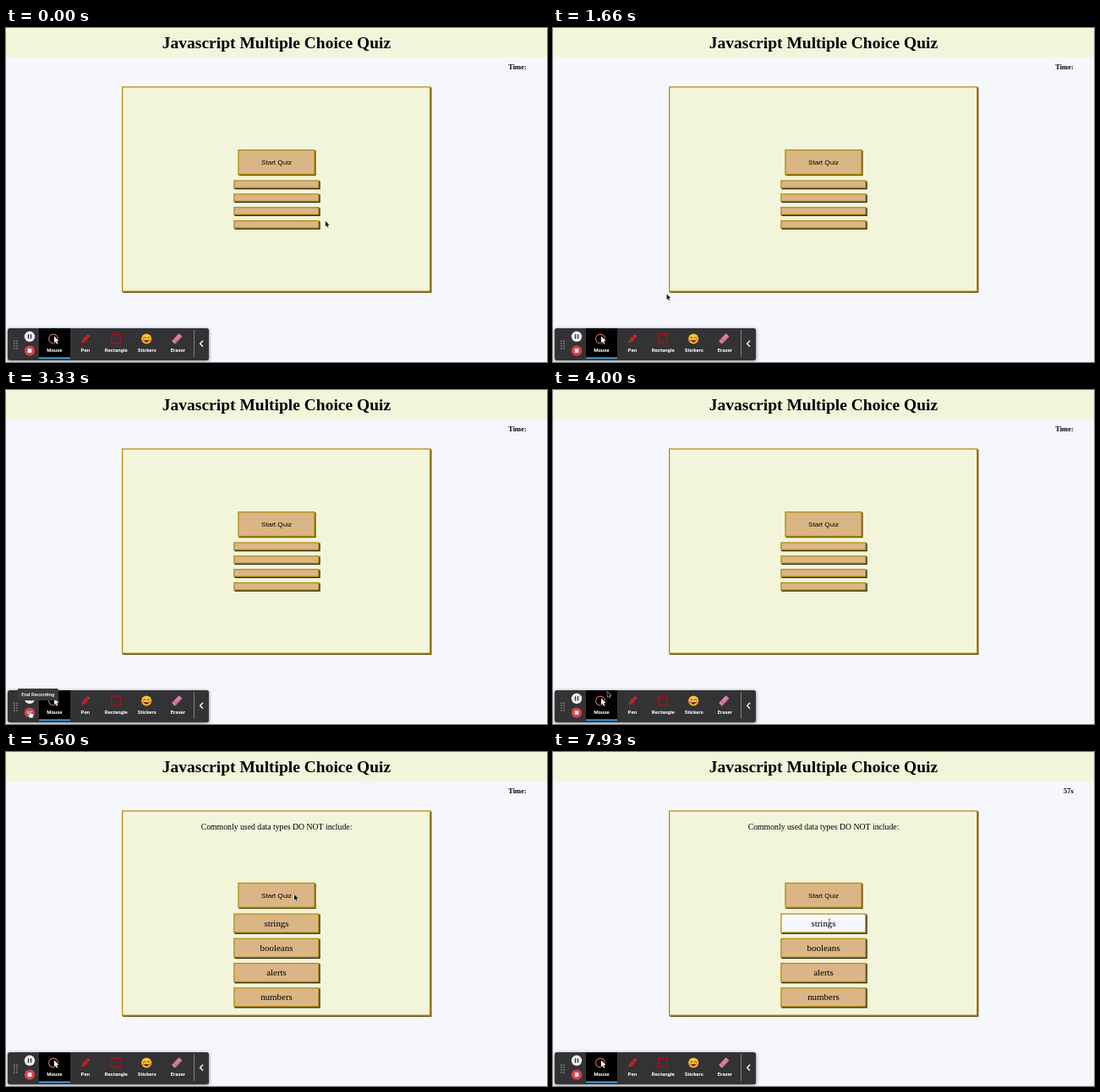
An HTML page with a canvas for the animation above (8000 ms loop, 640 px wide and 396 px high).

```html
<!DOCTYPE html>
<html lang="en">
<head>
<meta charset="utf-8">
<title>Quiz demo</title>
<style>
html, body { margin: 0; width: 100%; height: 100%; overflow: hidden; background: #f6f6fd; }
canvas { display: block; width: 640px; height: 396px; }
</style>
</head>
<body>
<canvas id="stage"></canvas>
<script>
const LOOP = 8000, STEP = 1000 / 15;
const SERIF = '"Liberation Serif", "Times New Roman", serif';
const SANS = '"Liberation Sans", Arial, sans-serif';
const UI = 'Roboto, sans-serif';
const BEIGE = '#f2f5da', TAN = '#dab686', GOLD = '#b08b10', PAGE = '#f6f6fd';

const canvas = document.getElementById('stage');
const dpr = window.devicePixelRatio || 1;
canvas.width = 640 * dpr;
canvas.height = 396 * dpr;
const c = canvas.getContext('2d');

// Pointer path: time, x, y
const path = [
  [0, 378, 229], [467, 340, 258], [600, 340, 258], [1400, 157, 301],
  [1533, 157, 301], [2000, 44, 374], [2333, 44, 374], [2667, 29, 381],
  [2800, 29, 381], [3133, 27, 382], [3333, 28, 380], [3533, 28, 380],
  [3667, 36, 376], [3733, 36, 376], [3867, 52, 366], [3933, 52, 366],
  [4467, 337, 165], [5533, 337, 165], [5667, 345, 173],
  [6800, 345, 173], [7067, 327, 202], [LOOP, 327, 202]
];

function pointerAt(t) {
  const i = Math.max(1, path.findIndex(k => k[0] >= t));
  const [t0, x0, y0] = path[i - 1], [t1, x1, y1] = path[i];
  const p = (t - t0) / (t1 - t0), e = p * p * (3 - 2 * p);
  return [x0 + (x1 - x0) * e, y0 + (y1 - y0) * e];
}

function rect(x, y, w, h, fill) {
  c.fillStyle = fill;
  c.fillRect(x, y, w, h);
}

function round(x, y, w, h, r, fill) {
  c.beginPath();
  c.roundRect(x, y, w, h, r);
  c.fillStyle = fill;
  c.fill();
}

function disc(x, y, r, fill) {
  c.beginPath();
  c.arc(x, y, r, 0, Math.PI * 2);
  c.fillStyle = fill;
  c.fill();
}

function ring(x, y, r, color, width) {
  c.beginPath();
  c.arc(x, y, r, 0, Math.PI * 2);
  c.strokeStyle = color;
  c.lineWidth = width;
  c.stroke();
}

function text(str, x, y, font, align = 'center', fill = '#000') {
  c.font = font;
  c.textAlign = align;
  c.fillStyle = fill;
  c.fillText(str, x, y);
}

function poly(points, fill, stroke, width = 0.7) {
  c.beginPath();
  points.forEach(([x, y]) => c.lineTo(x, y));
  c.closePath();
  if (stroke) {
    c.strokeStyle = stroke;
    c.lineWidth = width;
    c.stroke();
  }
  c.fillStyle = fill;
  c.fill();
}

function panel(x, y, w, h, fill, shadow, edge = 1.25) {
  rect(x + 1.2, y + 1.2, w, h, shadow);
  rect(x, y, w, h, GOLD);
  rect(x + edge, y + edge, w - 2 * edge, h - 2 * edge, fill);
}

function at(x, y, draw, angle = 0) {
  c.save();
  c.translate(x, y);
  c.rotate(angle);
  draw();
  c.restore();
}

function drawPage(t) {
  rect(0, 0, 640, 396, PAGE);
  rect(0, 0, 640, 34.7, BEIGE);
  text('Javascript Multiple Choice Quiz', 320, 23.6, `bold 19.5px ${SERIF}`);

  const clock = t < 5790 ? 'Time:' : t < 6790 ? '59s' : t < 7790 ? '58s' : '57s';
  text(clock, 615.8, 48.7, `bold 8.53px ${SERIF}`, 'right');

  panel(137, 69.3, 365.3, 243.5, BEIGE, '#6b5510');

  const started = t > 4720;
  const top = started ? 154.8 : 144;
  panel(274.3, top, 91.2, 30, TAN, '#6b5510');
  text('Start Quiz', 320, top + 18.1, `8.12px ${SANS}`);

  if (started) text('Commonly used data types DO NOT include:', 320, 91.5, `9.75px ${SERIF}`);
  ['strings', 'booleans', 'alerts', 'numbers'].forEach((label, i) => {
    const y = started ? 191.4 + 29.25 * i : 180.4 + 15.85 * i;
    const hover = i === 0 && t > 6990;
    panel(269.2, y, 101.3, started ? 23.2 : 9.7, hover ? PAGE : TAN, '#2b2410');
    if (started) text(label, 320, y + 15.3, `10.96px ${SERIF}`);
  });
}

function arrow(fill, edge, k = 1) {
  c.scale(k, k);
  poly([[0, 0], [0, 7.4], [1.7, 5.9], [2.9, 8.6], [4.1, 8.1], [2.9, 5.4], [5.2, 5.2]], fill, edge, 1);
}

function hand() {
  c.beginPath();
  c.moveTo(-0.8, 5);
  c.lineTo(-0.8, 0.2);
  c.quadraticCurveTo(0, -1, 0.9, 0.2);
  c.lineTo(0.9, 3);
  c.lineTo(4.2, 3.6);
  c.quadraticCurveTo(5.2, 4, 5, 5.6);
  c.lineTo(4, 9);
  c.lineTo(0, 9);
  c.lineTo(-2.8, 5.6);
  c.quadraticCurveTo(-2.6, 4, -0.8, 5.4);
  c.closePath();
  c.fillStyle = '#fff';
  c.fill();
  c.strokeStyle = '#222';
  c.lineWidth = 0.8;
  c.stroke();
}

function beam() {
  c.beginPath();
  for (const s of [-1, 1]) {
    c.moveTo(-1.6, 4.2 * s);
    c.quadraticCurveTo(0, 4.2 * s, 0, 3 * s);
    c.quadraticCurveTo(0, 4.2 * s, 1.6, 4.2 * s);
  }
  c.moveTo(0, -3.4);
  c.lineTo(0, 3.4);
  c.moveTo(-1, 1.4);
  c.lineTo(1, 1.4);
  c.strokeStyle = '#777';
  c.lineWidth = 0.8;
  c.stroke();
}

function pen() {
  round(-1.9, -6.2, 3.8, 3, 1, '#e5202c');
  rect(-1.9, -2.6, 3.8, 5.4, '#e5202c');
  poly([[-1.9, 3.3], [1.9, 3.3], [0, 6.8]], '#e5202c');
  rect(-0.3, -1.8, 0.6, 4, '#8c1019');
}

function sticker() {
  disc(0, 0, 6, '#fbc52f');
  for (const s of [-1, 1]) {
    c.beginPath();
    c.arc(2.4 * s, -0.6, 1.3, Math.PI, 0);
    c.strokeStyle = '#5b3513';
    c.lineWidth = 0.8;
    c.stroke();
    disc(4 * s, 1.6, 1.5, '#f0803c');
  }
  c.beginPath();
  c.arc(0, 1.4, 2.7, 0, Math.PI);
  c.fillStyle = '#7a2a18';
  c.fill();
}

function eraser() {
  round(-2.7, -6.3, 5.4, 12.6, 1, '#d982a4');
  rect(-2.7, 2.2, 5.4, 0.7, '#a65475');
  rect(1.5, -5.6, 1.2, 11, '#b9668a');
}

function drawToolbar() {
  c.save();
  c.shadowColor = 'rgba(0,0,0,.5)';
  c.shadowBlur = 4 * dpr;
  c.shadowOffsetY = dpr;
  round(2, 356, 238, 38, 2.5, '#333335');
  c.restore();

  for (let i = 0; i < 8; i++) disc(9.8 + 3.2 * (i % 2), 371.2 + 2.9 * (i >> 1), 0.75, '#b5b5b5');

  disc(28, 365.8, 6.2, '#eee');
  rect(25.8, 363.2, 1.4, 5.2, '#333');
  rect(28.8, 363.2, 1.4, 5.2, '#333');
  disc(28, 382.6, 6.2, '#d9404c');
  round(25.7, 380.3, 4.6, 4.6, 0.6, '#fff');

  rect(39, 356, 37, 36, '#000');
  rect(39, 390.4, 37, 1.8, '#3f9fe8');
  ring(56, 368.5, 5.4, '#d4696c', 1.1);
  at(57, 365.6, () => arrow('#fff', '#000', 1.05));

  at(94, 368.6, pen, 0.75);
  c.strokeStyle = '#a80f1b';
  c.lineWidth = 1.5;
  c.strokeRect(124.7, 363.3, 10.6, 10.4);
  at(166.2, 368.6, sticker);
  at(202.3, 368.4, eraser, 0.75);

  ['Mouse', 'Pen', 'Rectangle', 'Stickers', 'Eraser'].forEach((label, i) =>
    text(label, 57.3 + 36.5 * i, 384.3, `bold 6px ${UI}`, 'center', '#fff'));

  rect(222, 358, 0.9, 32, '#888');
  c.beginPath();
  c.moveTo(233, 370.8);
  c.lineTo(229.6, 374.3);
  c.lineTo(233, 377.8);
  c.strokeStyle = '#fff';
  c.lineWidth = 1.4;
  c.stroke();
}

function tooltip(label, x, y) {
  round(x, y, 48.6, 14, 2, '#3a3a3c');
  text(label, x + 24.3, y + 9.2, `500 6px ${UI}`, 'center', '#fff');
}

function drawPointer(t) {
  const [x, y] = pointerAt(t);
  if (t > 4650 && t < 4790) {
    c.globalAlpha = t < 4720 ? 0.9 : 0.4;
    ring(x + 0.3, y - 0.3, 19.8, '#e04f4c', 2);
    c.globalAlpha = 1;
  }
  const overBar = t > 1950 && t < 3930;
  at(x, y, () => {
    if (overBar) hand();
    else if (t > 6990) beam();
    else arrow('#111', '#fff', 0.88);
  });
}

function render(time) {
  const t = Math.floor((time % LOOP + 8) / STEP) * STEP % LOOP;
  c.setTransform(dpr, 0, 0, dpr, 0, 0);
  drawPage(t);
  drawToolbar();
  if (t > 2320 && t < 2520) tooltip('Mouse Pointer', 35, 333.4);
  if (t > 2520 && t < 3790) tooltip('End Recording', 13.5, 354);
  drawPointer(t);
}

let start;
function loop(now) {
  start ??= now;
  render(now - start);
  requestAnimationFrame(loop);
}
render(0);
requestAnimationFrame(loop);
</script>
</body>
</html>
```
